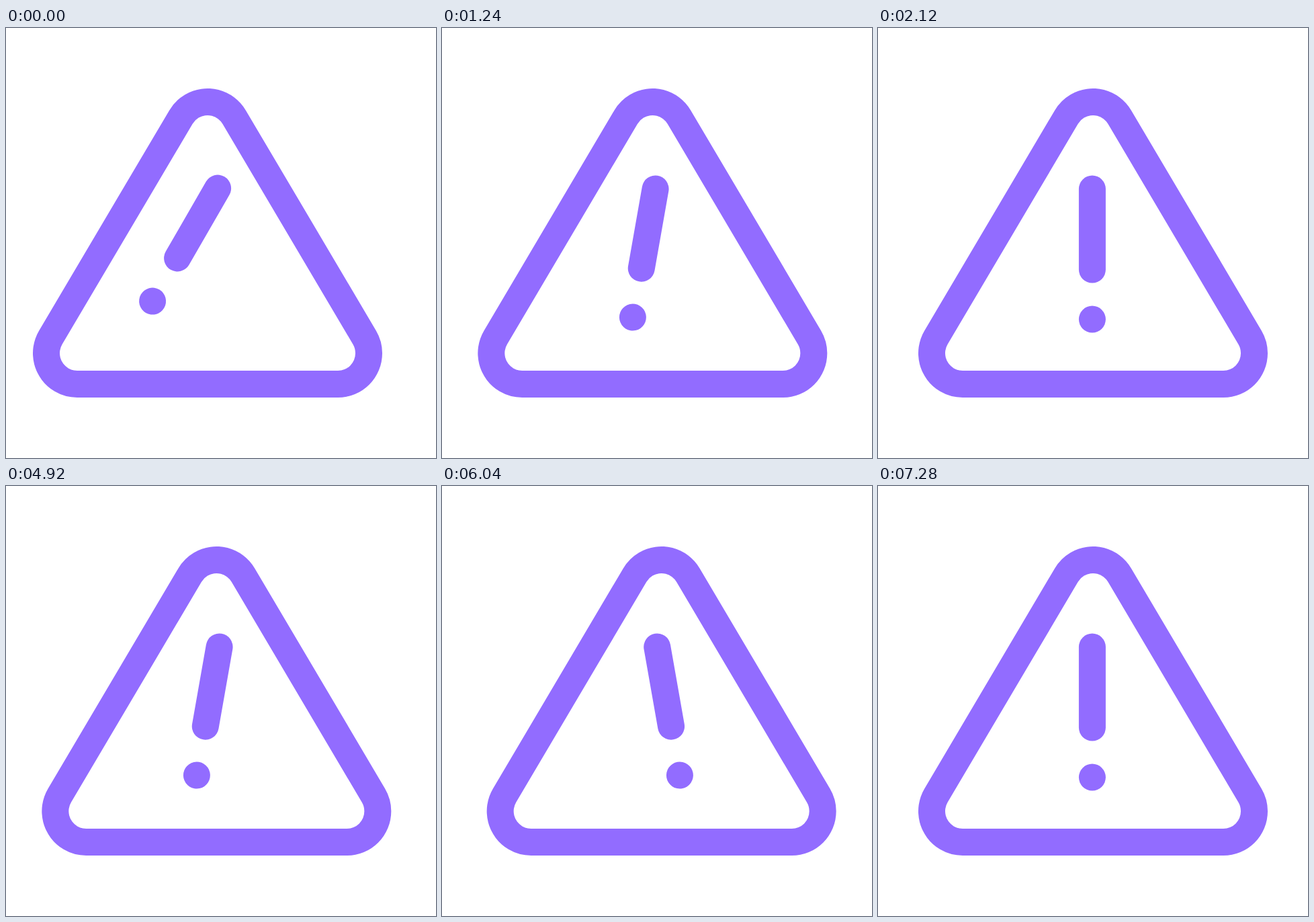
An HTML page that plays this animation: 640 px wide and 640 px high, repeating every 8000 ms.

```html
<!DOCTYPE html>
<html lang="en">
<head>
<meta charset="utf-8">
<title>Warning sign</title>
<style>
  html, body { margin: 0; height: 100%; overflow: hidden; background: #fff; }
  svg { display: block; width: 100%; height: 100%; }
  path, line { stroke-linejoin: round; stroke-linecap: round; }
</style>
</head>
<body>
<svg viewBox="0 0 640 640">
  <g id="sign">
    <path d="M320 156 126 484H514Z" fill="#926cff" stroke="#926cff" stroke-width="132"/>
    <path d="M320 156 126 484H514Z" fill="#fff" stroke="#fff" stroke-width="52"/>
  </g>
  <g id="mark" fill="#926cff" stroke="#926cff">
    <line x1="318.9" y1="239.6" x2="318.9" y2="359.6" stroke-width="40"/>
    <circle cx="318.9" cy="433.6" r="20" stroke="none"/>
  </g>
</svg>
<script>
  const LOOP = 8000, BEAT = 560, BEAT_START = 120;
  const TICKS = [0, 140, 180, 320, 440]; // uneven steps within one beat
  const SWING = 20, SHAKE_STEPS = 18;
  const LEAD_IN = 43, SECOND_SHAKE = 46;

  const sign = document.getElementById('sign');
  const mark = document.getElementById('mark');

  function stepAt(ms) {
    const beat = Math.floor((ms - BEAT_START) / BEAT);
    const rest = ms - BEAT_START - beat * BEAT;
    return beat * TICKS.length + TICKS.filter(tick => tick <= rest).length;
  }

  // Triangle wave: left, right and back in six steps
  const shake = n => SWING - Math.abs(3 - n % 6) * SWING * 2 / 3;

  function offsetAt(step) {
    if (step <= SHAKE_STEPS) return shake(step);
    const n = step - SECOND_SHAKE;
    if (n >= 0 && n <= SHAKE_STEPS) return shake(n);
    if (n < 0 && step > LEAD_IN) return (LEAD_IN - step) * SWING / 3;
    return 0;
  }

  function draw() {
    const x = offsetAt(stepAt(performance.now() % LOOP));
    sign.setAttribute('transform', `translate(${x} 0)`);
    mark.setAttribute('transform', `rotate(${-1.5 * x} 318.9 232)`);
    requestAnimationFrame(draw);
  }
  draw();
</script>
</body>
</html>
```
